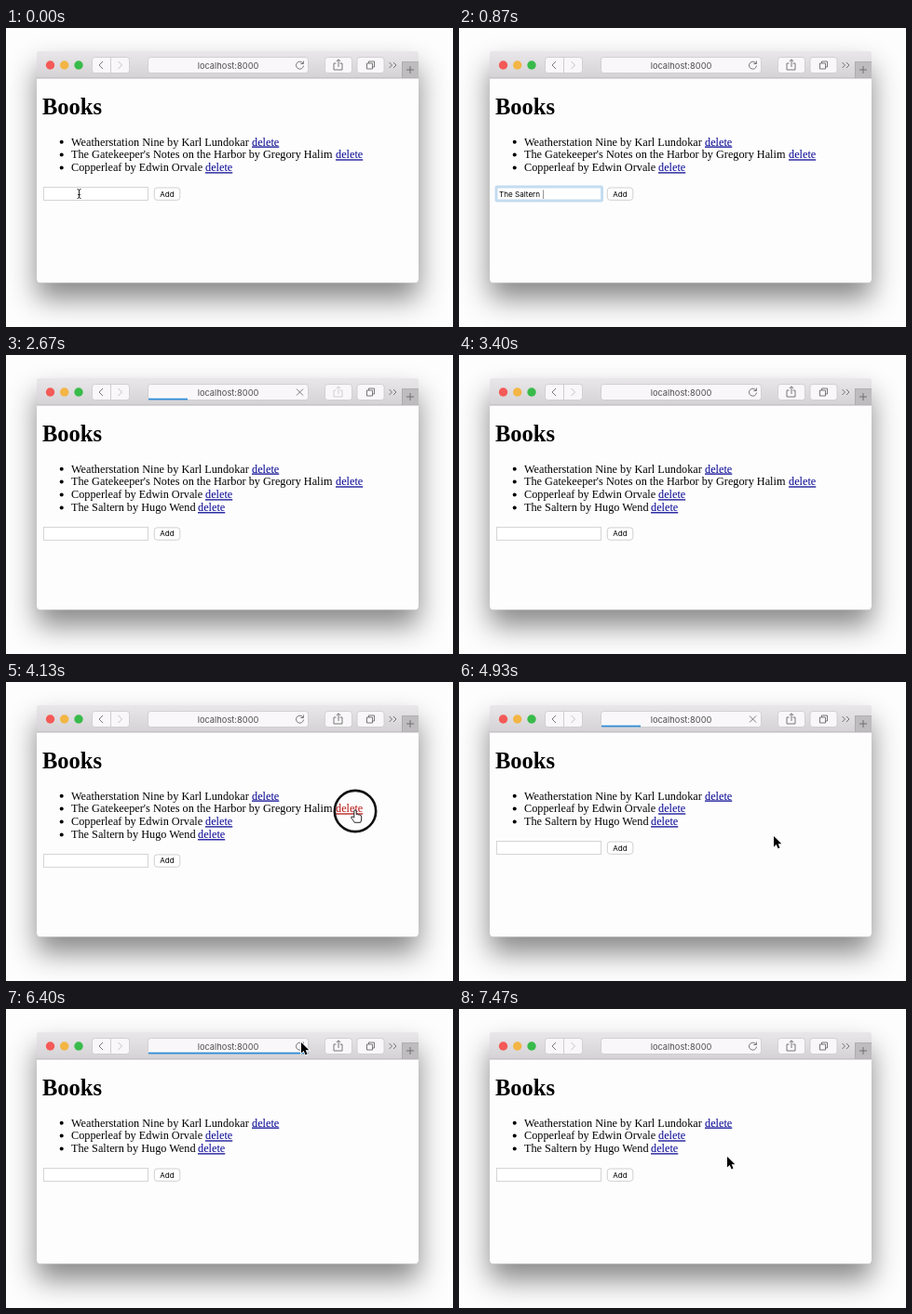
Animation, 480 px wide and 322 px high, one loop 7540 ms. Source, as an HTML page:

```html
<!DOCTYPE html>
<html lang="en">
<meta charset="utf-8">
<title>Books</title>
<style>
html, body { margin: 0; width: 100%; height: 100%; overflow: hidden; background: #fefdfe }
svg { display: block; width: 480px; height: 322px }
.serif { font: 12.25px "Liberation Serif", serif }
.ui { font: 8.1px Inter, sans-serif }
.window { fill: #fefdfe; filter: drop-shadow(0 0 .5px #0005) drop-shadow(0 17px 15px #0007) }
.btn { fill: #f9f7f9; stroke: #cbc9cb; stroke-width: .8 }
.line { fill: none; stroke: #6a6a6a; stroke-width: .9 }
.link { fill: #000090; text-decoration: underline }
</style>
<svg viewBox="0 0 480 322">
  <defs>
    <linearGradient id="bar" x2="0" y2="1">
      <stop stop-color="#e9e7e9"/><stop offset="1" stop-color="#d4d2d4"/>
    </linearGradient>
  </defs>
  <rect class="window" x="33" y="25" width="410" height="249.5" rx="4"/>
  <path d="M33 54V29q0-4 4-4H439q4 0 4 4V54Z" fill="url(#bar)"/>
  <path d="M425 54V36.5H443V54Z" fill="#bebcbe"/>
  <path d="M33 54H443M425.5 36.5V54M425 36.5H443" class="line" style="stroke:#aba9ab;stroke-width:.8"/>
  <circle cx="47.5" cy="40" r="4.7" fill="#f45a57"/>
  <circle cx="62.7" cy="40" r="4.7" fill="#f3b544"/>
  <circle cx="78" cy="40" r="4.7" fill="#38bb4a"/>
  <rect class="btn" x="92.5" y="31.5" width="40" height="17" rx="3"/>
  <rect class="btn" x="152.5" y="31.5" width="172" height="17" rx="3"/>
  <rect class="btn" x="342.5" y="31.5" width="29" height="17" rx="3"/>
  <rect class="btn" x="377" y="31.5" width="29" height="17" rx="3"/>
  <path class="line" d="M112.5 32V48" style="stroke:#cbc9cb"/>
  <path class="line" d="M104 36l-4 4 4 4"/>
  <path class="line" d="M120.5 36l4 4-4 4" style="stroke:#bbb"/>
  <path class="line" d="M387.5 38h6v6h-6zM389.5 38v-2h6v6h-2M411.5 37l3 3-3 3M416 37l3 3-3 3M434 41v8M430 45h8"/>
  <text x="238.5" y="43.6" text-anchor="middle" style="font:9.3px Inter,sans-serif" fill="#505050">localhost:8000</text>
  <text x="39" y="93" style="font:bold 24.5px 'Liberation Serif',serif">Books</text>
  <g id="live"></g>
</svg>
<script>
const LOOP = 7540, FPS = 15;
const live = document.getElementById('live');

// title, x of its delete link
const books = [
  ['Weatherstation Nine by Karl Lundokar', 264],
  ["The Gatekeeper's Notes on the Harbor by Gregory Halim", 354],
  ['Copperleaf by Edwin Orvale', 214],
  ['The Saltern by Hugo Wend', 206],
];
const ADDED = 2270, DELETED = 4470;

// start, leaving the first quarter, full, gone
const loads = [[2130, 2730, 3000, 3400], [4270, 5000, 5200, 5390], [5530, 6100, 6330, 6670]];
const greyShare = [[2530, 2870], [4470, 4740], [5670, 5940]];
const typing = [[140, 670, 12], [870, 1200, 7], [1470, 1670, 5]];
const clicks = [[4060, 375, 139], [5395, 317, 40]];
const path = [
  [3600, 405, 128], [3830, 405, 128], [4000, 375, 138], [4500, 375, 138], [4620, 359, 160],
  [4780, 346, 182], [4930, 338, 166], [5260, 317, 36], [7340, 317, 36], [7460, 288, 159],
];

const ramp = (t, a, b) => Math.min(1, Math.max(0, (t - a) / (b - a)));
const within = (t, a, b) => t >= a && t < b;
const stroke = (d, color = '#6a6a6a') => `<path class="line" d="${d}" style="stroke:${color}"/>`;

function toolbar(t) {
  const grey = greyShare.some(([a, b]) => within(t, a, b));
  const load = loads.find(([a, , , end]) => within(t, a, end));
  let out = stroke('M354.5 38h-2.5v7h9v-7h-2.5M357 42v-8M354.8 36l2.2-2.2 2.2 2.2', grey ? '#ccc' : '#6a6a6a');
  if (load) {
    const [start, leave, full, end] = load;
    const width = 42 * ramp(t, start, start + 200) + 129.5 * ramp(t, leave, full);
    out += `<rect x="153" y="46.7" width="${width}" height="1.7" fill="#2a8ad8" opacity="${1 - ramp(t, end - 200, end)}"/>`;
  }
  return out + (load && t < load[2]
    ? stroke('M312 36.5l7 7M319 36.5l-7 7')
    : stroke('M319 38.2a4 4 0 1 0 .5 2.4M319.4 35.5v3h-3'));
}

function list(t) {
  const shown = books.filter((_, i) => i == 1 ? t < DELETED : i < 3 || t >= ADDED);
  const rows = shown.map(([title, x], i) => {
    const y = 126.5 + i * 13.9;
    const pressed = title == books[1][0] && within(t, 4060, 4270);
    return `<circle cx="59.7" cy="${y - 3.8}" r="2"/><text class="serif" x="70" y="${y}">${title}</text>
      <text class="serif link" x="${x}" y="${y}" ${pressed ? 'style="fill:#b4100c"' : ''}>delete</text>`;
  });
  return rows.join('') + form(t, (shown.length - 3) * 13.9);
}

function form(t, dy) {
  const focused = within(t, 60, ADDED);
  const count = typing.reduce((n, [a, b, k]) => n + Math.floor(k * ramp(t, a, b) + .01), 0);
  const caret = within(t, 60, 1990) ? '<tspan fill="#555">|</tspan>' : '';
  return `<g class="ui" transform="translate(0 ${dy})">
    <rect x="40.5" y="171.5" width="112" height="14" fill="#fff" stroke="#d2d0d2" stroke-width=".9"/>
    ${focused ? `<rect x="40" y="171" width="113.5" height="15" rx="1" fill="none" stroke="#c3dcf0" stroke-width="3"/>
      <text x="43" y="181.5">${books[3][0].slice(0, count)}${caret}</text>` : ''}
    <rect x="159.3" y="172" width="27.5" height="13.3" rx="3" fill="#fff" stroke="#c6c4c6" stroke-width=".8"/>
    <text x="173" y="181.5" text-anchor="middle">Add</text></g>`;
}

function pointer(t) {
  if (t < 60) return stroke('M76.5 173.5q2 0 2 1.5v7q0 1.5-2 1.5M80.5 173.5q-2 0-2 1.5v7q0 1.5 2 1.5M77 179.5h3', '#222');
  if (t < path[0][0]) return '';
  const i = path.findIndex(p => p[0] > t);
  const [t1, x1, y1] = path.at(i), [t0, x0, y0] = path.at(i < 0 ? -1 : i - 1);
  const u = t1 == t0 ? 1 : ramp(t, t0, t1), k = u * u * (3 - 2 * u);
  const shape = within(t, 3960, DELETED)
    ? '<path d="M-1.2 8V1a1.2 1.2 0 0 1 2.4 0V4.6q1.3-.7 2 .4 1.4-.5 1.9.5 1.6-.2 1.6 1.4V9q0 2-1 4.3H-.8q-1-2-2.6-3.8-1.6-1.8-.6-2.4 1-.5 2.8 1Z" fill="#fff" stroke="#111" stroke-width=".9"/>'
    : '<path d="M0 0V11.5L2.7 9 4.6 13.4 6.5 12.5 4.7 8.3H8.3Z" stroke="#fff" stroke-width="1.6" paint-order="stroke"/>';
  const rings = clicks.filter(([a]) => within(t, a, a + 141)).map(([a, x, y]) =>
    `<circle cx="${x}" cy="${y}" r="${19 + 14 * (1 - ramp(t, a, a + 140)) ** 2}" fill="none" stroke="#111" stroke-width="2.6"/>`);
  return `${rings.join('')}<g transform="translate(${x0 + (x1 - x0) * k} ${y0 + (y1 - y0) * k})">${shape}</g>`;
}

let last = -1;
function draw(now) {
  const step = Math.floor(now % LOOP * FPS / 1000 + .1);
  if (step != last) {
    const t = step * 1000 / FPS;
    live.innerHTML = toolbar(t) + list(t) + pointer(t);
    last = step;
  }
  requestAnimationFrame(draw);
}
draw(0);
</script>
</html>
```
